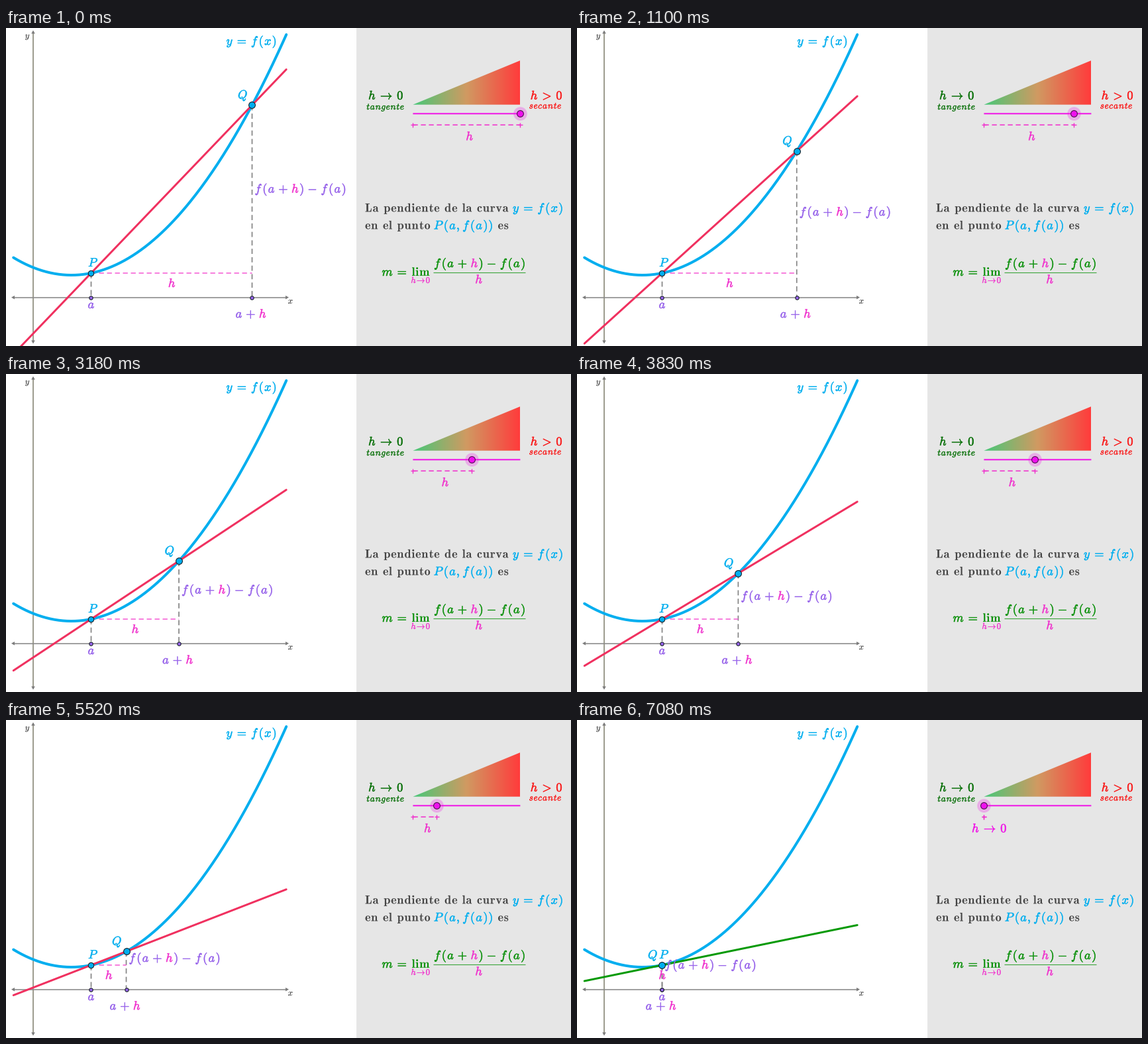
Write a matplotlib script that moves like this. It is 853 by 480 pixels and loops after 8000 ms.

```python
import matplotlib.pyplot as plt
import numpy as np
from matplotlib.animation import FuncAnimation
from matplotlib.colors import LinearSegmentedColormap
from matplotlib.patches import PathPatch, Polygon, Rectangle
from matplotlib.path import Path
from matplotlib.textpath import TextPath
from matplotlib.transforms import Affine2D

W, H, DPI = 853, 480, 64
INTERVAL, LOOP = 20, 8000
STEPS = 55

BLUE, RED, GREEN = "#00aeef", "#f0305f", "#079a07"
PURPLE, PINK, MAGENTA = "#9560ea", "#f032cd", "#f014e6"
GRAY, INK = "#848484", "#444444"
FORMULA = "#078f07"

plt.rcParams["mathtext.fontset"] = "cm"

fig = plt.figure(figsize=(W / DPI, H / DPI), dpi=DPI, facecolor="white")
ax = fig.add_axes([0, 0, 1, 1])


def px(width):
    return width * 72 / DPI


# ---------- bold text ----------
# advance widths in em
MATH = {
    "a": .633, "h": .668, "f": .70, "(": .447, ")": .447, "+": .894,
    "-": .894, "=": .894, ">": .894, "→": 1.15, "y": .59, "x": .66,
    "P": .88, "Q": .83, "m": 1.0, "0": .575, ",": .319, " ": .19,
    "t": .42, "n": .694, "g": .545, "e": .54, "s": .54, "c": .514,
}
ROMAN = {
    "L": .692, "a": .559, "c": .511, "d": .639, "e": .527, "i": .319,
    "l": .319, "m": .958, "n": .639, "o": .575, "p": .639, "r": .474,
    "s": .454, "t": .447, "u": .639, "v": .607, " ": .383,
}
PAD = {"+": .2555, "-": .2555, "=": .32, ">": .32, "→": .32}


def glyph(ch, size, roman):
    body = {"→": r"\rightarrow"}.get(ch, ch)
    if roman:
        body = rf"\mathbf{{{body}}}"
    return TextPath((0, 0), f"${body}$", size=size)


class Label:
    """Coloured spans on one baseline; x is the left edge of the ink."""

    def __init__(self, spans, x=0, y=0, size=17.5, roman=False,
                 tight=False, weight=.034, z=6):
        self.tr = Affine2D().translate(x, y)
        self.parts = []
        widths = ROMAN if roman else MATH
        pen = None
        for text, color in spans:
            paths = []
            for ch in text:
                pad = 0 if tight or roman else PAD.get(ch, 0)
                cell = (widths[ch] + 2 * pad) * size
                if ch != " ":
                    path = glyph(ch, size * 1.05, roman)
                    box = path.get_extents()
                    if pen is None:
                        pen = (box.width - cell) / 2
                    dx = pen + (cell - box.width) / 2 - box.x0
                    flip = Affine2D().scale(1, -1).translate(dx, 0)
                    paths.append(flip.transform_path(path))
                pen += cell
            lw = 0 if roman else px(size * weight)
            part = PathPatch(Path.make_compound_path(*paths), fc=color,
                             ec=color, lw=lw, zorder=z,
                             transform=self.tr + ax.transData)
            ax.add_patch(part)
            self.parts.append(part)

    def move(self, x, y):
        self.tr.clear().translate(x, y)

    def show(self, on):
        for part in self.parts:
            part.set_visible(on)


def line(xs, ys, color, width, z=3, dashed=False, cap="butt", snap=False):
    style = (0, (4.6, 2.9)) if dashed else "-"
    return ax.plot(xs, ys, color=color, lw=px(width), ls=style, zorder=z,
                   solid_capstyle=cap, snap=snap)[0]


def dot(x, y, r, color, edge="#182028", width=1.1, z=8, alpha=1):
    return ax.plot([x], [y], "o", ms=px(2 * r), mfc=color, mec=edge,
                   mew=px(width), zorder=z, alpha=alpha, snap=False)[0]


def arrow_tip(x, y, dx, dy):
    base = (x - 5 * dx, y - 5 * dy)
    pts = [(x, y), (base[0] - 2.8 * dy, base[1] + 2.8 * dx),
           (base[0] + 2.8 * dy, base[1] - 2.8 * dx)]
    ax.add_patch(Polygon(pts, fc="#7c7c7c", ec="none", zorder=3))


# ---------- curve ----------
X0, X1 = 11.2, 423.2
PX, SPAN, AXIS_Y = 128.5, 243, 406.7


def f(x):
    return 373 - .00345 * (x - 98.8) ** 2


PY = f(PX)

line([41, 41], [8, 473], "#98978a", 1.9, z=2, snap=True)
line([12, 423], [AXIS_Y, AXIS_Y], "#8a8a8a", 1.6, z=2, snap=True)
arrow_tip(41, 3.5, 0, -1)
arrow_tip(41, 476.5, 0, 1)
arrow_tip(8, AXIS_Y, -1, 0)
arrow_tip(427, AXIS_Y, 1, 0)
Label([("y", "#222222")], 29, 15.5, size=12.5, weight=.005)
Label([("x", "#222222")], 426, 416, size=12.5, weight=.005)

xs = np.linspace(X0, X1, 200)
line(xs, f(xs), BLUE, 4, z=4, cap="round")
line([PX, PX], [PY, AXIS_Y], GRAY, 1.7, dashed=True)
dot(PX, PY, 4.2, BLUE)
dot(PX, AXIS_Y, 2.7, "#9a66f0")
Label([("y=f(x)", BLUE)], 333, 25.5)
Label([("P", BLUE)], 124.8, 360)
Label([("a", PURPLE)], 124.2, 423)

secant = line([X0, X1], [0, 0], RED, 3, z=5, cap="round")
drop = line([0, 0], [0, 0], GRAY, 1.7, dashed=True)
run = line([0, 0], [PY, PY], "#f560d6", 1.6, dashed=True)
q_dot = dot(PX, PY, 4.9, BLUE, z=9)
q_foot = dot(PX, AXIS_Y, 2.7, "#9a66f0")
q_name = Label([("Q", BLUE)])
run_name = Label([("h", PINK)])
foot_name = Label([("a+", PURPLE), ("h", PINK)])
rise_name = Label([("f(a+", PURPLE), ("h", PINK), (")-f(a)", PURPLE)])

# ---------- side panel ----------
ax.add_patch(Rectangle((529, 0), W - 529, H, fc="#e6e6e6", ec="none",
                       zorder=0))

SX, SLEN, SY, MY = 614.4, 162, 129.3, 146.3
ramp = LinearSegmentedColormap.from_list(
    "ramp", ["#46c878", "#d09a62", "#ff3c3c"])
wedge = ax.imshow(np.linspace(0, 1, 256)[None, :], cmap=ramp, aspect="auto",
                  extent=(SX, SX + SLEN, 116, 49), zorder=2)
corners = [(SX, 115.7), (SX + SLEN, 49), (SX + SLEN, 115.7), (SX, 115.7)]
wedge.set_clip_path(Path(corners), ax.transData)

Label([("h→0", "#056e05")], 548, 107.7)
Label([("tangente", "#056e05")], 544.5, 123, size=12.8)
Label([("h>0", "#fa1414")], 792.7, 107.7)
Label([("secante", "#fa1414")], 790.3, 121.5, size=12.7)

line([SX, SX + SLEN], [SY, SY], MAGENTA, 2)
halo = dot(SX, SY, 10.3, MAGENTA, edge="none", width=0, z=6, alpha=.27)
knob = dot(SX, SY, 4.9, "#ee10ee", edge="#501050")
gauge = line([SX, SX], [MY, MY], PINK, 1.6, dashed=True)
ends = ax.plot([SX, SX], [MY, MY], "+", color=PINK, ms=px(7),
               mew=px(1.4), zorder=4, snap=False)[0]
gauge_name = Label([("h", PINK)])
limit_name = Label([("h→0", MAGENTA)], 597, 169.3)

Label([("La pendiente de la curva", INK)], 542.5, 277.5, size=17.4,
      roman=True)
Label([("y=f(x)", BLUE)], 765.5, 277.5)
Label([("en el punto", INK)], 542.5, 303.7, size=17.4, roman=True)
Label([("P(a, f(a))", BLUE)], 646.5, 303.7)
Label([("es", INK)], 743, 303.7, size=17.4, roman=True)

Label([("m=", FORMULA)], 568, 374)
Label([("lim", FORMULA)], 613, 374, size=17.4, roman=True)
Label([("h→0", PINK)], 612, 384.8, size=12.2, tight=True)
Label([("f(a+", FORMULA), ("h", PINK), (")-f(a)", FORMULA)], 647, 361)
line([645, 784.5], [368.5, 368.5], "#3aa53a", 1.1, snap=True)
Label([("h", PINK)], 709.3, 385.3)

ax.set_xlim(0, W)
ax.set_ylim(H, 0)
ax.axis("off")


def draw(i):
    step = min(STEPS, (i * INTERVAL + 70) // 130)
    h = 1 - step / STEPS
    done = step == STEPS

    qx = PX + SPAN * h
    qy = f(qx)
    slope = -.00345 * (qx + PX - 2 * 98.8)
    secant.set_ydata([PY + slope * (x - PX) for x in (X0, X1)])
    secant.set_color(GREEN if done else RED)
    drop.set_data([qx, qx], [qy, AXIS_Y])
    run.set_data([PX, qx], [PY, PY])
    q_dot.set_data([qx], [qy])
    q_foot.set_data([qx], [AXIS_Y])
    q_name.move(qx - 20.6, qy - 9.7)
    run_name.move((PX + qx) / 2 - 4.2, 391)
    foot_name.move(qx - 24.3, 437.2)
    rise_name.move(qx + 5, (PY + qy) / 2 + 5.3)

    sx = SX + SLEN * h
    halo.set_data([sx], [SY])
    knob.set_data([sx], [SY])
    gauge.set_data([SX, sx], [MY, MY])
    ends.set_data([SX, sx], [MY, MY])
    gauge_name.move((SX + sx) / 2 - .1, 169.3)
    gauge_name.show(not done)
    limit_name.show(done)
    return []


anim = FuncAnimation(fig, draw, frames=LOOP // INTERVAL, interval=INTERVAL,
                     repeat=True, repeat_delay=0)
plt.show()
```
